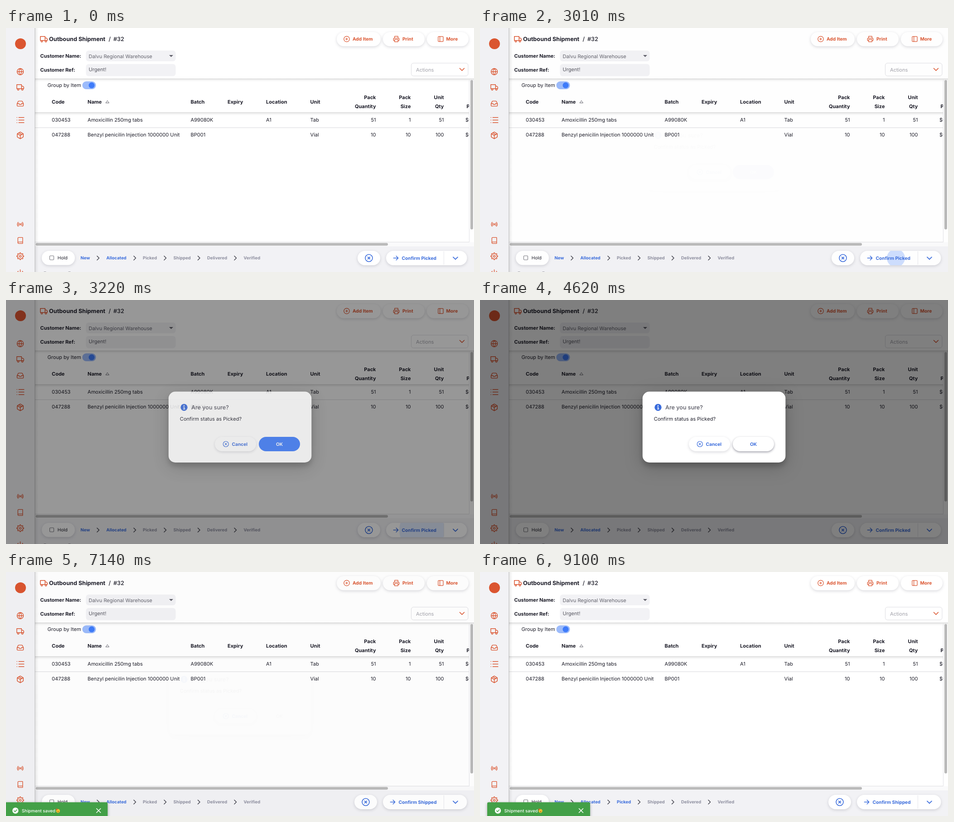
An HTML page for the animation above (9.45 s loop, 1033 by 542 pixels).

```html
<!DOCTYPE html>
<html lang="en">
<head>
<meta charset="utf-8">
<title>Outbound shipment</title>
<style>
  html, body { margin: 0; width: 100%; height: 100%; overflow: hidden; background: #fff; }
  svg { display: block; }
  text { font-family: Inter, "Open Sans", sans-serif; text-rendering: geometricPrecision; white-space: pre; }
  .pill { fill: #fff; filter: drop-shadow(0 2px 3px rgba(96, 97, 112, .24)); }
  .dialog { filter: drop-shadow(0 8px 6px rgba(0, 0, 0, .2)) drop-shadow(0 9px 19px rgba(0, 0, 0, .2)); }
  .toast { filter: drop-shadow(0 2px 3px rgba(0, 0, 0, .3)); }
</style>
</head>
<body>
<svg id="stage" width="1033" height="542" viewBox="0 0 1033 542">
  <defs>
    <linearGradient id="side"><stop stop-opacity=".2"/><stop offset=".35" stop-opacity=".06"/><stop offset="1" stop-opacity="0"/></linearGradient>
    <linearGradient id="down" x2="0" y2="1"><stop stop-opacity=".2"/><stop offset=".3" stop-opacity=".06"/><stop offset="1" stop-opacity="0"/></linearGradient>
    <clipPath id="table"><rect x="64" y="114" width="958.5" height="362"/></clipPath>
    <clipPath id="okClip"><rect x="558" y="304" width="91" height="32" rx="16"/></clipPath>
  </defs>
</svg>
<script>
const LOOP = 9450, STEP = 70;
const ORANGE = '#db5530', BLUE = '#3a6cdc', FILL = '#3e7bfa', INK = '#1c1c28', MUTED = '#8f90a0', PANEL = '#f2f2f5';
const stage = document.getElementById('stage');
const byId = id => document.getElementById(id);

const rect = (x, y, w, h, fill, extra = '') =>
  `<rect x="${x}" y="${y}" width="${w}" height="${h}" fill="${fill}" ${extra}/>`;
const pill = (x, y, w, h, extra = '') => rect(x, y, w, h, '#fff', `rx="${h / 2}" class="pill" ${extra}`);
const text = (x, y, str, { size = 11.1, weight = 400, fill = INK, anchor = 'start', id = '' } = {}) =>
  `<text x="${x}" y="${y}" font-size="${size}" font-weight="${weight}" fill="${fill}" text-anchor="${anchor}" ${id && `id="${id}"`}>${str}</text>`;
const line = (d, color, width = 1.5) =>
  `<path d="${d}" fill="none" stroke="${color}" stroke-width="${width}" stroke-linecap="round" stroke-linejoin="round"/>`;
const ring = (x, y, r) => `M${x - r} ${y}a${r} ${r} 0 1 0 ${2 * r} 0a${r} ${r} 0 1 0 ${-2 * r} 0`;

function gearPath() {
  const points = [];
  for (let i = 0; i < 64; i++) {
    const a = i / 64 * 2 * Math.PI;
    const r = 9.3 + 1.7 * Math.tanh(2.5 * Math.cos(8 * a));
    points.push(`${(12 + r * Math.cos(a)).toFixed(2)} ${(12 + r * Math.sin(a)).toFixed(2)}`);
  }
  return `M${points.join('L')}Z${ring(12, 12, 3)}`;
}

// Icon outlines on a 24 unit grid.
const ICONS = {
  globe: ring(12, 12, 10) + 'M2 12h20M12 2a15.3 15.3 0 0 1 4 10 15.3 15.3 0 0 1-4 10 15.3 15.3 0 0 1-4-10 15.3 15.3 0 0 1 4-10z',
  truck: 'M1 3h15v13H1zM16 8h4l3 3v5h-7z' + ring(5.5, 18.5, 2.5) + ring(18.5, 18.5, 2.5),
  inbox: 'M22 12h-6l-2 3h-4l-2-3H2M5.45 5.11L2 12v6a2 2 0 0 0 2 2h16a2 2 0 0 0 2-2v-6l-3.45-6.89A2 2 0 0 0 16.76 4H7.24a2 2 0 0 0-1.79 1.11z',
  list: 'M8 5h14M8 12h14M8 19h14M3 5h.1M3 12h.1M3 19h.1',
  box: 'M21 16V8a2 2 0 0 0-1-1.7l-7-4a2 2 0 0 0-2 0l-7 4A2 2 0 0 0 3 8v8a2 2 0 0 0 1 1.7l7 4a2 2 0 0 0 2 0l7-4A2 2 0 0 0 21 16zM3.3 7l8.7 5 8.7-5M12 22V12M7.5 4.3l9 5',
  radio: ring(12, 12, 2) + 'M16.2 7.8a6 6 0 0 1 0 8.5M7.8 16.2a6 6 0 0 1 0-8.5M19 5a10 10 0 0 1 0 14M5 19a10 10 0 0 1 0-14',
  book: 'M4 19.5A2.5 2.5 0 0 1 6.5 17H20M6.5 2H20v20H6.5A2.5 2.5 0 0 1 4 19.5v-15A2.5 2.5 0 0 1 6.5 2z',
  gear: gearPath(),
  power: 'M18.4 6.6a9 9 0 1 1-12.8 0M12 2v10',
  plus: ring(12, 12, 10) + 'M12 8v8M8 12h8',
  cross: ring(12, 12, 10) + 'M15 9l-6 6M9 9l6 6',
  printer: 'M6 9V2h12v7M6 18H4a2 2 0 0 1-2-2v-5a2 2 0 0 1 2-2h16a2 2 0 0 1 2 2v5a2 2 0 0 1-2 2h-2M6 14h12v8H6z',
  columns: 'M5 3h14a2 2 0 0 1 2 2v14a2 2 0 0 1-2 2H5a2 2 0 0 1-2-2V5a2 2 0 0 1 2-2zM9 3v18',
  arrow: 'M5 12h14M13 6l6 6-6 6'
};
const icon = (name, cx, cy, scale = .7, color = ORANGE, width = 2) =>
  `<g transform="translate(${cx - 12 * scale} ${cy - 12 * scale}) scale(${scale})">${line(ICONS[name], color, width)}</g>`;

const BUTTON = { size: 10.2, weight: 700 };

function sidebar() {
  const items = [['globe', 97], ['truck', 132], ['inbox', 168], ['list', 204.5, .82], ['box', 238.5, .74],
    ['radio', 436, .66], ['book', 472, .66], ['gear', 507], ['power', 544]];
  return rect(0, 0, 63.5, 542, PANEL) +
    `<circle cx="32" cy="35" r="12" fill="${ORANGE}"/>` +
    items.map(([name, y, scale]) => icon(name, 31.5, y, scale)).join('');
}

function header() {
  const actions = [[730, 97, 'plus', 752, 'Add Item', 765], [832, 92, 'printer', 861.5, 'Print', 875], [929, 92, 'columns', 959.5, 'More', 971.5]];
  return icon('truck', 83.5, 25, .69, ORANGE, 2.2) +
    text(95, 29, 'Outbound Shipment', { size: 12.7, weight: 700 }) +
    text(226.5, 29, '/', { size: 12.7, weight: 500 }) + text(237, 29, '#32', { size: 12.7, weight: 500 }) +
    text(75.5, 66, 'Customer Name:', { weight: 700, size: 11 }) +
    text(75.5, 97.3, 'Customer Ref:', { weight: 700, size: 11 }) +
    rect(176.5, 50, 198, 24, PANEL, 'rx="6"') + rect(176.5, 80, 198, 27, PANEL, 'rx="6"') +
    text(182.5, 66.8, 'Dalvu Regional Warehouse', { fill: '#63636d' }) +
    text(182.5, 96, 'Urgent!', { fill: '#55555f' }) +
    '<path d="M360 60h9l-4.500 4.500z" fill="#63636d"/>' +
    actions.map(([x, w, name, ix, label, tx]) => pill(x, 9, w, 31.5) + icon(name, ix, 24.5, .62) +
      text(tx, 28.2, label, { ...BUTTON, fill: ORANGE })).join('') +
    rect(894.5, 78, 125.5, 28.5, '#fff', 'rx="5" stroke="#dddde2"') +
    text(905, 96.7, 'Actions', { fill: '#a0a0a8' }) + line('M1001.500 89.500l5 5 5-5', ORANGE, 1.6);
}

function table() {
  const bold = { weight: 700, size: 11 };
  const right = { ...bold, anchor: 'end' };
  const heads = [[101, 'Code'], [180, 'Name'], [407.5, 'Batch'], [489, 'Expiry'], [574, 'Location'], [671.5, 'Unit']];
  const numbers = [[816.5, 'Pack', 'Quantity'], [893.5, 'Pack', 'Size'], [966.5, 'Unit', 'Qty']];
  const rows = [
    [207.5, ['030453', 'Amoxicillin 250mg tabs', 'A99080K', '', 'A1', 'Tab'], ['51', '1', '51']],
    [241, ['047288', 'Benzyl penicilin Injection 1000000 Unit', 'BP001', '', '', 'Vial'], ['10', '10', '100']]
  ];
  const cells = rows.map(([y, left, nums]) =>
    left.map((s, i) => s && text(heads[i][0], y, s)).join('') +
    nums.map((s, i) => text(numbers[i][0], y, s, { anchor: 'end' })).join('') + text(1014, y, '$0.00')).join('');
  return '<g clip-path="url(#table)">' +
    heads.map(([x, s]) => text(x, 168, s, bold)).join('') +
    numbers.map(([x, a, b]) => text(x, 158.3, a, right) + text(x, 177.5, b, right)).join('') +
    text(1016.5, 177.5, 'Price', bold) + line('M220.500 166.500h7l-3.500-5z', '#55555f', .9) + cells +
    rect(64, 221, 959, 1, '#d9d9dc') + '</g>' +
    rect(64, 112.5, 969, 7, 'url(#down)') + rect(64, 187.5, 958, 7, 'url(#down)') +
    text(91.5, 131.3, 'Group by Item') +
    rect(168.5, 118.5, 30, 17.5, '#9cbbfb', 'rx="8.75"') + `<circle cx="189" cy="127.300" r="6.500" fill="${FILL}"/>` +
    rect(64, 475, 959, 1, '#dedee1') + rect(1022, 115, 1, 361, '#e2e2e5') +
    rect(1025, 115.5, 6, 332, '#bababa', 'rx="3"');
}

function confirm(id, left, label) {
  const half = `M966.500 495V527H${left + 16}a16 16 0 0 1 0-32z`;
  const color = `${id}Ink`;
  return `<g id="${id}">` + pill(left - 63, 495, 50, 32) + icon('cross', left - 38, 511, .8, BLUE) +
    pill(left, 495, 1017.5 - left, 32) +
    `<clipPath id="${id}Clip"><path d="${half}"/></clipPath><path id="${id}Fill" d="${half}" fill="${FILL}" opacity="0"/>` +
    `<g clip-path="url(#${id}Clip)"><circle id="${id}Ripple" cx="918" cy="511" r="0" fill="${FILL}" opacity="0"/></g>` +
    rect(966, 496, 1, 30, '#e6e6ea') +
    `<g id="${color}" style="color:${BLUE}">` + icon('arrow', left + 21.5, 511, .74, 'currentColor') +
    text(left + 34.5, 514.5, label, { ...BUTTON, fill: 'currentColor' }) + '</g>' +
    line('M987 508.800l5 5 5-5', BLUE, 1.7) + '</g>';
}

function footer() {
  const steps = [[164.5, 'New', 1], [221.5, 'Allocated', 1], [302, 'Picked'], [369.5, 'Shipped'], [444, 'Delivered'], [524.5, 'Verified']];
  return rect(64, 485, 969, 57, PANEL) + rect(64, 476, 969, 9, '#fafafb') + rect(65.5, 477.5, 777.5, 6, '#bababa', 'rx="3"') +
    pill(79, 495, 73, 31.5) + rect(96.5, 506, 9, 9, 'none', 'rx="1.5" stroke="#77777f" stroke-width="1.1"') +
    text(113.8, 514.3, 'Hold', { size: 10 }) +
    steps.map(([x, s, on]) => text(x, 514.3, s, { size: 9.5, weight: 700, fill: on ? BLUE : MUTED, id: 'step' + s })).join('') +
    [203, 284, 351, 425.5, 506].map(x => line(`M${x - 2} 506.500l4.500 4.500-4.500 4.500`, '#44444e', 1.5)).join('') +
    line('M84 542h4M138 542h4', '#55555f', 1) +
    confirm('picked', 839, 'Confirm Picked') + confirm('shipped', 832, 'Confirm Shipped');
}

function dialog() {
  return rect(0, 0, 1033, 542, '#000', 'id="backdrop" opacity="0"') + '<g id="dialog">' +
    rect(358.8, 203.5, 315.5, 157.5, '#fff', 'rx="15" class="dialog"') +
    `<circle cx="393" cy="238.500" r="7.700" fill="${BLUE}"/><circle cx="393" cy="234.800" r="1.200" fill="#fff"/>` +
    line('M391.800 237.600h1.500v4.500M391.500 242.300h3.500', '#fff', 1.4) +
    text(409, 243, 'Are you sure?', { size: 12.6, weight: 500, fill: '#555560' }) +
    text(383.8, 268.3, 'Confirm status as Picked?') +
    pill(461, 304, 91, 32) + icon('cross', 485.3, 320, .6, BLUE) + text(498.5, 323.8, 'Cancel', { ...BUTTON, fill: BLUE }) +
    rect(558, 304, 91, 32, FILL, 'id="ok" rx="16"') +
    `<g clip-path="url(#okClip)"><circle id="okRipple" cx="604" cy="320" r="0" fill="${FILL}" opacity="0"/></g>` +
    text(603.5, 323.8, 'OK', { ...BUTTON, anchor: 'middle', id: 'okLabel' }) + '</g>';
}

function toast() {
  return '<g id="toast">' + rect(16, 511.5, 227, 40, '#43a047', 'rx="3" class="toast"') +
    '<circle cx="39.500" cy="530" r="6.700" fill="#fff"/>' + line('M36.500 530.200l2.200 2.200 4-4.300', '#43a047', 1.5) +
    text(53.5, 533.8, 'Shipment saved', { size: 9.7, weight: 500, fill: '#fff' }) +
    '<circle cx="133.500" cy="530.700" r="4.200" fill="#fbc531"/><path d="M129 529.500l.5-4.500 4.500 2z" fill="#d2632e"/>' +
    line('M131.800 530.300h.1M135 530.300h.1M132.500 532.700h2.500', '#70430f', 1) +
    line('M218.500 525.500l9 9M227.500 525.500l-9 9', '#fff', 1.6) + '</g>';
}

stage.insertAdjacentHTML('beforeend', header() + table() + footer() + sidebar() +
  rect(63, 0, 9, 542, 'url(#side)') + dialog() + toast());

const clamp = v => Math.min(1, Math.max(0, v));
const progress = (t, start, length) => clamp((t - start) / length);

function bezier(x1, y1, x2, y2) {
  const curve = (a, b, s) => 3 * a * s * (1 - s) ** 2 + 3 * b * s * s * (1 - s) + s ** 3;
  return x => {
    let lo = 0, hi = 1;
    for (let i = 0; i < 20; i++) {
      const mid = (lo + hi) / 2;
      if (curve(x1, x2, mid) < x) lo = mid; else hi = mid;
    }
    return x <= 0 ? 0 : x >= 1 ? 1 : curve(y1, y2, hi);
  };
}
const easeInOut = bezier(.4, 0, .2, 1);
const easeOut = bezier(0, 0, .2, 1);

const rgb = hex => [1, 3, 5].map(i => parseInt(hex.slice(i, i + 2), 16));
const mix = (a, b, k) => {
  const to = rgb(b);
  return `rgb(${rgb(a).map((v, i) => Math.round(v + (to[i] - v) * k))})`;
};
const set = (id, attrs) => {
  for (const name in attrs) byId(id).setAttribute(name, attrs[name]);
};
const show = (id, on) => set(id, { display: on ? 'inline' : 'none' });

function draw(t) {
  const swapped = t >= 6790;
  show('picked', !swapped);
  show('shipped', swapped);
  set('stepPicked', { fill: t >= 7490 ? BLUE : MUTED });

  const hover = t < 1470 ? 0 : 1 - easeInOut(progress(t, 2800, 210));
  set('pickedFill', { opacity: hover });
  byId('pickedInk').style.color = mix(BLUE, '#ffffff', hover);
  const press = progress(t, 2870, 560);
  set('pickedRipple', { r: 80 * press, opacity: press ? .25 * (1 - progress(t, 3080, 350)) : 0 });

  const open = easeInOut(progress(t, 2980, 450)) * (1 - easeInOut(progress(t, 6950, 240)));
  set('backdrop', { opacity: .5 * open });
  set('dialog', { opacity: open });
  show('dialog', open > 0);

  const light = easeInOut(progress(t, 4270, 350));
  const disabled = easeInOut(progress(t, 6020, 350));
  set('ok', { fill: mix(FILL, '#ffffff', light) });
  byId('ok').style.filter = `drop-shadow(0 2px 2.5px rgba(40, 41, 61, ${.45 * light * (1 - disabled)}))`;
  set('okLabel', { fill: disabled ? mix(BLUE, '#a6a6a6', disabled) : mix('#ffffff', BLUE, light) });
  const okPress = progress(t, 5810, 560);
  set('okRipple', { r: 50 * easeInOut(okPress), opacity: okPress ? .25 * (1 - progress(t, 6160, 560)) : 0 });

  const slide = easeOut(progress(t, 6957, 285));
  show('toast', slide > 0);
  set('toast', { transform: `translate(${243 * (slide - 1)} 0)` });
}

function tick() {
  const t = performance.now() % LOOP;
  draw(Math.floor(t / STEP) * STEP);
  requestAnimationFrame(tick);
}
tick();
</script>
</body>
</html>
```
